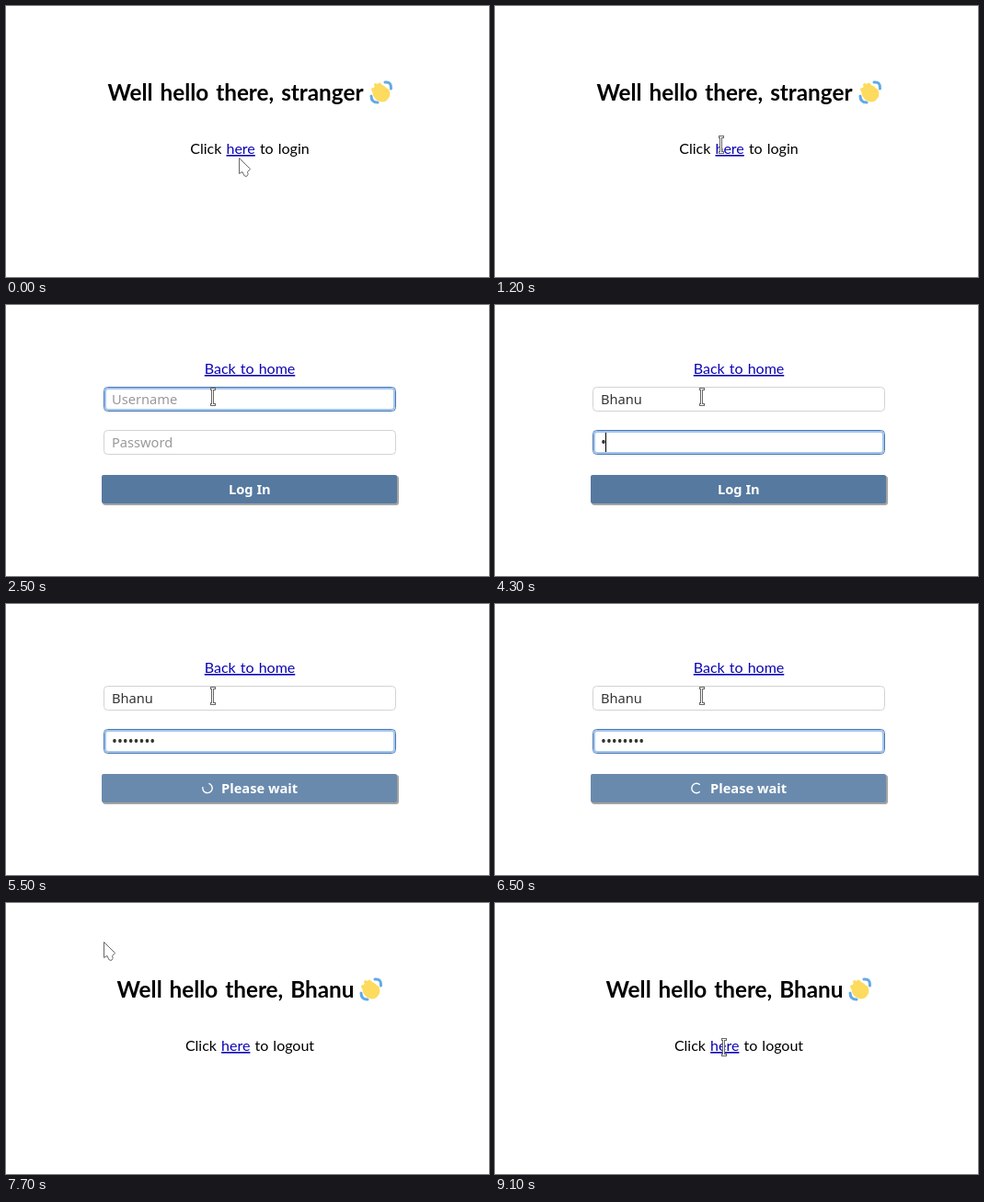
Write an HTML page that moves like this. It is 525 px wide and 295 px high and loops after 9.6 s.

```html
<!DOCTYPE html>
<html lang="en">
<head>
<meta charset="utf-8">
<title>Login demo</title>
<style>
  html, body { margin: 0; width: 100%; height: 100%; overflow: hidden; background: #fff; }
  svg { display: block; width: 525px; height: 295px; font: 14.65px "Noto Sans", "Open Sans", sans-serif; }
  text { white-space: pre; }
  .title, .body { font-family: Lato, "Noto Sans", sans-serif; text-anchor: middle; }
  .title { font-size: 24.3px; font-weight: 700; word-spacing: 2px; }
  .body { font-size: 16px; word-spacing: 1px; }
  .link { fill: #0b04b4; text-decoration: underline 1px; text-underline-offset: 2px; }
  .field rect { fill: #fff; stroke: #d3d3d3; }
  .field .glow { fill: none; stroke: #a3c5ef; stroke-width: 2; visibility: hidden; }
  .field.focus .edge { stroke: #4d78b0; }
  .field.focus .glow { visibility: visible; }
  .field text { fill: #333; }
  .field text.empty { fill: #999; }
  .field text.dots { font-size: 15.7px; }
  .field .caret { fill: #000; stroke: none; }
  .button { font-weight: 700; }
  .button text { fill: #fff; }
  .spinner { fill: none; stroke: #fff; stroke-width: 1.4; }
  .pointer path { fill: #fff; stroke: #686868; stroke-linejoin: round; }
  .pointer .beam { fill: none; stroke-width: 3; }
  .pointer .core { fill: none; stroke: #fff; }
  .wave { fill: none; stroke: #fcdb5e; stroke-width: 4; stroke-linecap: round; }
  .wave .swish { stroke: #62a9e6; stroke-width: 3; }
  .wave ellipse { fill: #fcdb5e; stroke: none; }
</style>
</head>
<body>
<svg viewBox="0 0 525 295">
  <g id="home">
    <text id="title" class="title" x="249.500" y="103" data-cursor="ibeam"></text>
    <g id="wave" class="wave">
      <path class="swish" d="M17 2Q24 1 23.500 9M2 17Q2 24 9 24"/>
      <ellipse cx="12.500" cy="14" rx="10" ry="8.500" transform="rotate(50 12.500 14)"/>
      <path d="M4 10L9 15M7 5L13 12M11 4.500L17 12M19.500 11Q21 14 20 17"/>
    </g>
    <text class="body" x="265" y="161" data-cursor="ibeam">Click <tspan class="link" data-cursor="hand">here</tspan> to <tspan id="action"></tspan></text>
  </g>
  <g id="login">
    <text class="body link" x="265" y="75" data-cursor="hand">Back to home</text>
    <g id="user" class="field" transform="translate(106 89)">
      <rect class="edge" x=".5" y=".5" width="317" height="26" rx="4" data-cursor="ibeam"/>
      <rect class="glow" x="2" y="2" width="314" height="23" rx="3"/>
      <text x="9" y="19"></text>
      <rect class="caret" y="3" width="1" height="21"/>
    </g>
    <g id="pass" class="field" transform="translate(106 136)">
      <rect class="edge" x=".5" y=".5" width="317" height="26" rx="4" data-cursor="ibeam"/>
      <rect class="glow" x="2" y="2" width="314" height="23" rx="3"/>
      <text x="9" y="19"></text>
      <rect class="caret" y="3" width="1" height="21"/>
    </g>
    <g class="button">
      <rect x="105" y="186" width="322" height="32" rx="3" fill="#a3a3a3"/>
      <rect id="face" x="104" y="185" width="321" height="31" rx="2"/>
      <text id="label" y="206"></text>
      <path id="spinner" class="spinner" d="M3.700 3.700A5.200 5.200 0 1 1 3.700 -3.700"/>
    </g>
  </g>
  <g id="pointer" class="pointer">
    <path id="arrow" d="M.5 .5V17.500L4 15.500Q5.500 21 8 20.500Q11 19.500 9.500 15.500L12.500 12.500Z"/>
    <path id="hand" d="M-3.500 1.500Q-4 -.5 -1.500 -.5Q.5 -.5 1 1.500L2.500 7L9 8.500Q12 9 11.500 12L10 21H-2L-3.500 17.500L-7.500 12Q-7 9.500 -4 10.500L-2 11.500Z"/>
    <g id="ibeam">
      <path class="beam" d="M-3 -8.500H3M-.5 -8V8M-3 8.500H3"/>
      <path class="core" d="M-2 -8.500H2M-.5 -8V8M-2 8.500H2"/>
    </g>
  </g>
</svg>
<script>
  const LOOP = 9600, STEP = 100;
  const NAME = "Bhanu";
  const $ = id => document.getElementById(id);
  const show = (el, on) => { el.style.display = on ? "" : "none"; };
  const clamp = (v, lo, hi) => Math.min(hi, Math.max(lo, v));

  // Pointer glides: each passes its waypoints at an even pace along a smooth curve.
  const glides = [
    { start: 0, end: 500, via: [[253, 165], [246, 173], [413, 157]] },
    { start: 600, end: 1000, via: [[413, 157], [102, 126], [246, 151]] },
    { start: 1400, end: 2000, via: [[246, 151], [225, 100]] },
    { start: 7000, end: 9100, via: [[225, 100], [375, 240], [106, 42], [400, 150], [85, 150], [290, 40], [249, 157]] }
  ];

  function spline(a, b, c, d, u) {
    return b + u / 2 * (c - a + u * (2 * a - 5 * b + 4 * c - d + u * (3 * (b - c) + d - a)));
  }

  function position(t) {
    const { start, end, via } = glides.filter(g => g.start <= t).pop();
    const last = via.length - 1;
    const at = clamp((t - start) / (end - start), 0, 1) * last;
    const i = Math.min(Math.floor(at), last - 1);
    const [a, b, c, d] = [-1, 0, 1, 2].map(k => via[clamp(i + k, 0, last)]);
    return [0, 1].map(axis => Math.round(spline(a[axis], b[axis], c[axis], d[axis], at - i)));
  }

  // The innermost visible element under the pointer decides its shape.
  function cursorAt(x, y) {
    const hits = [...document.querySelectorAll("[data-cursor]")].filter(el => {
      const box = el.getBoundingClientRect();
      return x >= box.left && x < box.right && y >= box.top && y < box.bottom;
    });
    return hits.length ? hits.pop().dataset.cursor : "arrow";
  }

  // Characters entered; pace above 1 starts slowly, below 1 starts quickly.
  function typed(t, start, end, length, pace) {
    if (t < start) return 0;
    const progress = Math.min(1, (t - start) / (end - start));
    return 1 + Math.floor((length - 1) * progress ** pace);
  }

  function drawField(id, value, hint, focus, caretOn) {
    const field = $(id), text = field.querySelector("text"), caret = field.querySelector(".caret");
    field.classList.toggle("focus", focus);
    text.textContent = value || hint;
    text.setAttribute("class", !value ? "empty" : id === "pass" ? "dots" : "");
    show(caret, focus && caretOn);
    caret.setAttribute("x", 9 + (value ? Math.floor(text.getComputedTextLength()) : 0));
  }

  function drawHome(loggedIn) {
    $("title").textContent = "Well hello there, " + (loggedIn ? NAME : "stranger");
    $("wave").setAttribute("transform", `translate(${loggedIn ? 384 : 395} 81)`);
    $("action").textContent = loggedIn ? "logout" : "login";
  }

  function drawLogin(t) {
    const inUser = t >= 2000 && t < 3900, inPass = t >= 3900, waiting = t >= 5500;
    const userCaret = t < 2500 || (t >= 2900 && t < 3700);
    const name = NAME.slice(0, typed(t, 2900, 3500, NAME.length, 3.4));
    const dots = "•".repeat(typed(t, 4300, 5200, 8, 0.75));
    drawField("user", name, "Username", inUser, userCaret);
    drawField("pass", dots, "Password", inPass, !waiting);

    $("face").setAttribute("fill", waiting ? "#6a8aad" : "#56799f");
    $("label").textContent = waiting ? "Please wait" : "Log In";
    $("label").setAttribute("x", waiting ? 234 : 242);
    show($("spinner"), waiting);
    const angle = (Math.min(t, 6500) - 6500) / STEP * 48;
    $("spinner").setAttribute("transform", `translate(219 200.5) rotate(${angle})`);
  }

  function draw(t) {
    const onLogin = t >= 1400 && t < 6800;
    show($("home"), !onLogin);
    show($("login"), onLogin);
    if (onLogin) drawLogin(t); else drawHome(t >= 6800);

    const [x, y] = position(t);
    const cursor = cursorAt(x, y);
    for (const id of ["arrow", "hand", "ibeam"]) show($(id), id === cursor);
    $("pointer").setAttribute("transform", `translate(${x} ${y})`);
  }

  const begin = performance.now();
  let drawn = -1;
  function tick() {
    const t = Math.floor((performance.now() - begin) % LOOP / STEP) * STEP;
    if (t !== drawn) draw(drawn = t);
    requestAnimationFrame(tick);
  }
  tick();
</script>
</body>
</html>
```
